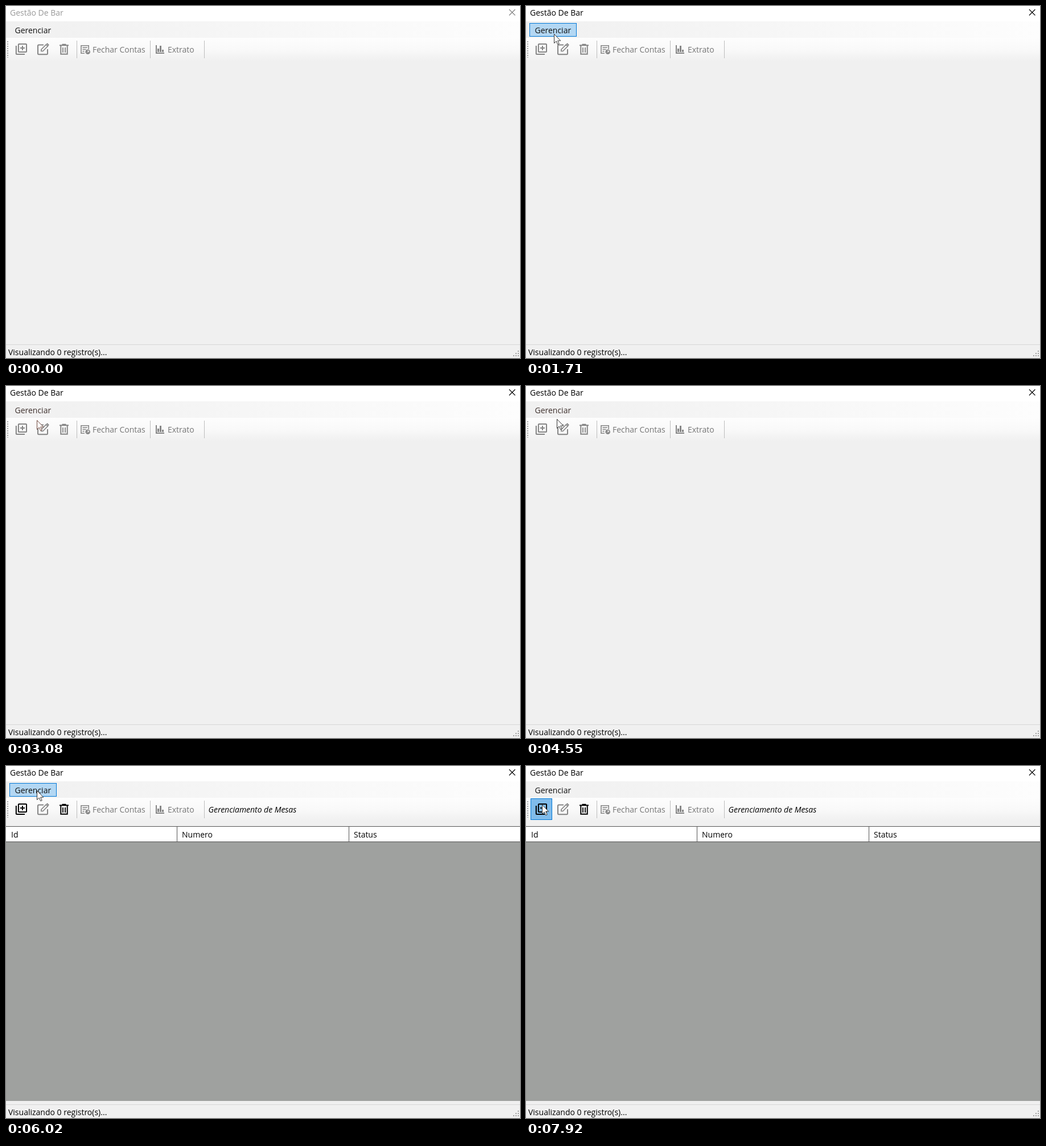
An HTML page that plays this animation: 903x620 px, repeating every 8 s.

```html
<!DOCTYPE html>
<html lang="pt">
<head>
<meta charset="utf-8">
<title>Gestão De Bar</title>
<style>
html, body { margin: 0; width: 100%; height: 100%; overflow: hidden; background: #f0f0f0; }
svg { display: block; }
text { font: 14px "Open Sans", "Noto Sans", sans-serif; }
.off { fill: #757575; }
</style>
</head>
<body>
<svg width="903" height="620" viewBox="0 0 903 620">
  <defs>
    <linearGradient id="strip"><stop stop-color="#f0f0f0"/><stop offset="1" stop-color="#fdfdfd"/></linearGradient>
    <linearGradient id="bar" x2="0" y2="1"><stop stop-color="#fdfdfd"/><stop offset=".5" stop-color="#f9f9f9"/><stop offset="1" stop-color="#f0f0f0"/></linearGradient>
  </defs>

  <!-- Window frame and bars -->
  <rect width="903" height="620" fill="#f0f0f0"/>
  <rect width="903" height="27" fill="#fff"/>
  <rect y="27" width="903" height="29" fill="url(#strip)"/>
  <rect y="56" width="903" height="41" fill="url(#bar)"/>
  <text id="title" x="7" y="17">Gestão De Bar</text>
  <path id="close" d="M884 6l10.500 10.500m0-10.500l-10.500 10.500" fill="none" stroke-width="1.100"/>

  <rect id="menu" x="6.500" y="30.500" width="82" height="23"/>
  <text id="menuText" x="15.500" y="47.500">Gerenciar</text>

  <!-- Toolbar -->
  <path d="M3 62V91" stroke="#a2a2a2" stroke-width="2" stroke-dasharray="2 2"/>
  <path d="M124.500 61v31M253.500 61v31M348.500 61v31" stroke="#bdbdbd"/>
  <rect id="button" x="8.500" y="57.500" width="37" height="37" stroke="#0078d7"/>
  <path class="live" transform="translate(14.800 63.900) scale(1.010)" d="M4 6H2v14c0 1.100.9 2 2 2h14v-2H4zM20 2H8C6.900 2 6 2.900 6 4v12c0 1.100.9 2 2 2h12c1.100 0 2-.9 2-2V4c0-1.100-.9-2-2-2zm0 14H8V4h12zM13 14h2v-3h3V9h-3V6h-2v3h-3v2h3z"/>
  <g fill="none" stroke="#858585" stroke-width="2">
    <path d="M66 68.500H57.500Q56 68.500 56 70V84Q56 85.300 57.500 85.300H71.500Q73 85.300 73 84V76"/>
    <path d="M62 79.500V76.500L70.500 68L73.300 70.800L64.800 79.500z" stroke-width="1.700"/>
    <path d="M71.500 67.200L72.500 66.500L74.600 68.600L73.500 69.800" stroke-width="1.800"/>
  </g>
  <g class="liveLine" fill="none" stroke-width="2">
    <path d="M94 69.300H110M98.500 67.800H105.500M96.300 70V84.800H107.700V70"/>
    <path d="M100 73V82M104 73V82" stroke-width="1.800"/>
  </g>
  <g fill="none" stroke="#858585" stroke-width="1.600">
    <path d="M138 83.200H132V69.800H145.200V76M134.500 73.200H142.800M134.500 76.500H140.500M134.500 79.800H137.500"/>
    <circle cx="143.700" cy="80.700" r="4.300" fill="#858585" stroke="none"/>
    <path d="M142 82.400L145.400 79M142.800 79H145.400V81.600" stroke="#fafafa" stroke-width="1"/>
  </g>
  <path d="M263 69h2v13h13v2h-15zM266 75h3v6h-3zM270 70h3v11h-3zM274 77h3v4h-3z" fill="#858585"/>
  <text class="off" x="152" y="82">Fechar Contas</text>
  <text class="off" x="284" y="82">Extrato</text>

  <!-- Table view -->
  <g id="table">
    <text x="355.500" y="82" font-style="italic" style="font-style:italic">Gerenciamento de Mesas</text>
    <rect y="106" width="903" height="484" fill="#9fa19f"/>
    <rect y="107" width="903" height="26" fill="#fff"/>
    <path d="M0 106.500H903M0 133.500H903M300.500 107V133M602.500 107V133" stroke="#555"/>
    <text x="9" y="126">Id</text>
    <text x="309" y="126">Numero</text>
    <text x="611" y="126">Status</text>
  </g>

  <!-- Status bar -->
  <path d="M0 596.500H903" stroke="#d7d7d7"/>
  <text x="4" y="615">Visualizando 0 registro(s)...</text>
  <path d="M899 607h2v2h-2zm-4 4h2v2h-2zm4 0h2v2h-2zm-8 4h2v2h-2zm4 0h2v2h-2zm4 0h2v2h-2z" fill="#a0a0a0"/>

  <!-- Drop-down panel -->
  <g id="drop">
    <rect x="10" y="57" width="156" height="95" fill="#000" opacity=".12"/>
    <rect x="6.500" y="53.500" width="155" height="94" fill="#fdfdfd" stroke="#808080"/>
    <rect x="8" y="55" width="25" height="91" fill="#f3f3f3"/>
    <path d="M7 53.500H88" stroke="#f7f7f7"/>
    <rect id="item" x="8.500" y="55.500" width="151" height="22" fill="#b3d7f3" stroke="#0078d7"/>
    <text x="39" y="72">Mesas</text>
  </g>

  <path id="cursor" d="M.5.5V16.500L4.200 13L6.800 18.700L9.200 17.600L6.700 12.100H11.700z" fill="#fff" stroke-width="1"/>
</svg>
<script>
const LOOP = 8000;
const start = { x: 775, y: 614 };
// Each move: begin, last step, number of steps, destination
const moves = [
  [260, 1030, 12, 37, 43],
  [1430, 1850, 7, 52, 50],
  [2120, 2400, 5, 53.500, 42],
  [2540, 2880, 5, 53.500, 60],
  [4550, 4760, 4, 53.500, 46],
  [5690, 5820, 3, 53.500, 43],
  [6550, 7030, 7, 22, 62],
  [7640, 7920, 5, 28, 68]
];
const $ = id => document.getElementById(id);
const set = (el, attrs) => { for (const k in attrs) el.setAttribute(k, attrs[k]); };
const show = (id, on) => set($(id), { visibility: on ? "visible" : "hidden" });
const smooth = p => p * p * (3 - 2 * p);
const clamp = v => Math.max(0, Math.min(1, v));

function cursorAt(t) {
  let { x, y } = start;
  for (const [t0, t1, n, tx, ty] of moves) {
    if (t < t0) break;
    const step = Math.floor((t - t0) / (t1 - t0) * (n - 1) + 1e-6);
    const p = smooth(Math.min(1, (step + 1) / n));
    x += (tx - x) * p;
    y += (ty - y) * p;
  }
  return { x, y };
}

function draw(t) {
  const { x, y } = cursorAt(t);
  const active = t >= 1570, loaded = t >= 6020;
  const open = t >= 2470 && t < 3080;
  const frozen = t >= 3080 && !loaded;
  const overMenu = t >= 260 && x >= 6 && x < 89 && y >= 30 && y < 54;
  const overButton = loaded && x < 46 && y > 57;

  set($("title"), { fill: active ? "#000" : "#999" });
  set($("close"), { stroke: active ? "#000" : "#808080" });

  show("menu", open || (overMenu && !frozen));
  set($("menu"), open ? { fill: "#f7f7f7", stroke: "#808080" } : { fill: "#b3d7f3", stroke: "#0078d7" });
  set($("menuText"), { fill: frozen ? "#3e302d" : "#111" });

  show("drop", open);
  set($("drop"), { opacity: t < 2950 ? clamp((t - 2400) / 210) : .5 });
  set($("item"), { opacity: y >= 55 ? 1 : 0 });

  show("table", loaded);
  document.querySelectorAll(".live").forEach(el => set(el, { fill: loaded ? "#000" : "#858585" }));
  document.querySelectorAll(".liveLine").forEach(el => set(el, { stroke: loaded ? "#000" : "#858585" }));
  show("button", overButton);
  set($("button"), { fill: t < 7030 ? "#b3d7f3" : "#80bceb" });

  show("cursor", t >= 260);
  set($("cursor"), {
    transform: `translate(${Math.round(x)} ${Math.round(y)})`,
    stroke: t >= 3080 && t < 4550 ? "#70483d" : "#333"
  });
}

function tick() {
  draw(performance.now() % LOOP);
  requestAnimationFrame(tick);
}
tick();
</script>
</body>
</html>
```
